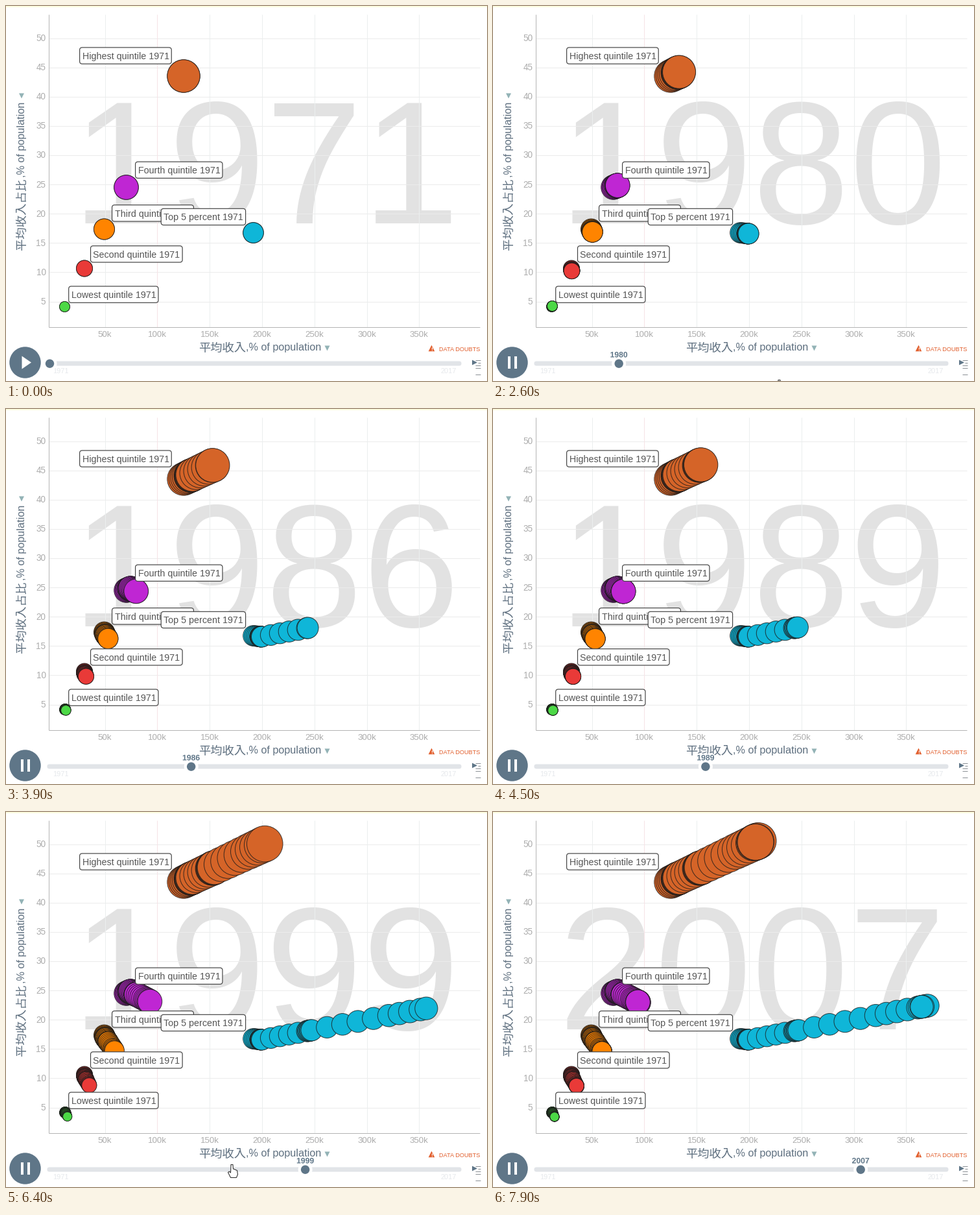
Write a matplotlib script that moves like this. It is 742 by 578 pixels and loops after 8000 ms.

```python
import numpy as np
import matplotlib.pyplot as plt
from matplotlib import patheffects
from matplotlib.animation import FuncAnimation
from matplotlib.patches import Circle, FancyBboxPatch, Polygon, Rectangle

W, H, DPI = 742, 578, 100
FRAMES, STEP = 80, 100
PT = 72 / DPI                      # points per pixel
SANS, CJK = "Liberation Sans", "Noto Sans CJK JP"
SLATE, INK, TICK, ARROW, ALERT = "#5f7688", "#5f7080", "#adadad", "#93b3b6", "#e2602f"

fig = plt.figure(figsize=(W / DPI, H / DPI), dpi=DPI, facecolor="white")
ax = fig.add_axes([0, 0, 1, 1])
ax.set(xlim=(-0.5, W - 0.5), ylim=(H - 0.5, -0.5))   # whole numbers are pixel centres
ax.axis("off")


# ---- drawing helpers (pixel coordinates, y down) ----
def text(x, y, s, size, color, font=SANS, z=3, **kw):
    return ax.text(x, y, s, fontsize=size * PT, color=color, family=font,
                   va="baseline", zorder=z, **kw)


def line(x, y, color, width=1, z=2):
    ax.plot(x, y, color=color, lw=width * PT, zorder=z, solid_capstyle="butt")


def shape(points, color, z=3, lw=0, **kw):
    return ax.add_patch(Polygon(points, fc=color, zorder=z, lw=lw, **kw))


def triangle(x, y, dx, dy, color, z=3):
    """Tip at (x + dx, y + dy), base centred on (x - dx, y - dy)."""
    base = np.array([x - dx, y - dy])
    side = np.array([dy, dx])
    return shape([base - side, base + side, (x + dx, y + dy)], color, z)


def box(x, y, w, h, color, z=3):
    return ax.add_patch(Rectangle((x, y), w, h, fc=color, lw=0, zorder=z))


def round_box(x, y, w, h, radius, z, **kw):
    ax.add_patch(FancyBboxPatch((x, y), w, h, zorder=z,
                                boxstyle=f"round,pad=0,rounding_size={radius}", **kw))


def disc(x, y, r, color, z):
    return ax.add_patch(Circle((x, y), r, fc=color, lw=0, zorder=z))


# ---- chart frame ----
box(-1, -1, W + 1, 2, "#fdfde0")
big_year = text(100.5, 335, "1971", 269, "#e2e2e2", z=1)

for i in range(10):
    y = 455 - 45.1 * i
    line([66, 730], [y, y], "#ebebeb")
    text(61, y + 4.5, str(5 * (i + 1)), 13.5, TICK, ha="right")
for i in range(7):
    x = 152 + 80.8 * i
    line([x, x], [12, 494], "#f6e3e6" if i == 1 else "#ebeeee")
    text(x, 509.5, f"{50 * (i + 1)}k", 13.2, TICK, ha="center")
line([65, 65], [12, 494], "#b4b4b4")
line([65, 730], [494, 494], "#b4b4b4")

UNIT = ",% of population"
text(297, 532, "平均收入", 18.3, INK, CJK)
text(370, 531, UNIT, 16.2, INK)
triangle(495, 527, 0, 4, ARROW)
turn = dict(rotation=90, rotation_mode="anchor", ha="left")
text(29, 375, "平均收入占比", 18.4, INK, CJK, **turn)
text(28, 264, UNIT, 16.2, INK, **turn)
triangle(23.5, 138, 0, 4, ARROW)

triangle(656, 527, 0, -4.8, ALERT)
line([656, 656], [525, 528.5], "white", 1.2, 4)
line([656, 656], [529.3, 530.5], "white", 1.2, 4)
text(667, 531, "DATA DOUBTS", 9.1, ALERT)

# ---- bubbles ----
# The pace drives every group: years since 1971, place of the top group.
PACE = np.array([(0, 381), (4, 391), (10, 394), (15, 464), (20, 471),
                 (25, 590), (29, 655), (35, 670), (37, 655)])
SLUMP, PEAK = 394, 670

# name, colour, then (x, y, radius) at the start, after the slump, at the peak
GROUPS = [
    ("Highest quintile", "#d56428", (273.5, 107.5, 25.7), (287, 101, 26), (408.5, 44, 28.5)),
    ("Fourth quintile", "#bf26d3", (185, 279, 19.3), (192, 276, 19.3), (224, 293, 19.3)),
    ("Third quintile", "#ff8400", (151, 343.5, 16.5), (153, 348, 16.3), (168, 369, 15.5)),
    ("Second quintile", "#e93a38", (120.5, 404, 13), (121, 408, 12.8), (128.5, 422, 12)),
    ("Lowest quintile", "#4cd846", (90, 463, 8.5), (91, 462, 8.4), (94.5, 469.5, 7.5)),
    ("Top 5 percent", "#0fb6d8", (381, 349, 16.3), (394, 350.5, 16.5), (670, 298, 18.2)),
]
bubbles = [ax.scatter([], [], c=color, edgecolors=(0.1, 0.1, 0.1, 0.8), linewidths=PT, zorder=5)
           for _, color, *_ in GROUPS]


def place_bubbles(age):
    """One bubble for each year passed, the current one last."""
    ages = np.append(np.arange(int(age) + 1), age)
    pace = np.interp(ages, *PACE.T)
    for dots, (_, _, *stages) in zip(bubbles, GROUPS):
        x, y, r = (np.interp(pace, [PACE[0, 1], SLUMP, PEAK], v) for v in zip(*stages))
        dots.set_offsets(np.column_stack([x, y]))
        dots.set_sizes(((2 * r - 1) * PT) ** 2)


# Each tag touches the upper left or right of its first bubble with one corner.
for i, (name, _, (x, y, r), *_) in enumerate(GROUPS):
    z = 6 + 0.1 * i
    on_left = name.startswith(("Highest", "Top"))
    bottom = y - 0.73 * r
    label = text(0, bottom - 7.3, f"{name} 1971", 14.3, "#555555", z=z + 0.05)
    width = label.get_window_extent().width + 7.5
    left = x - 0.73 * r - width if on_left else x + 0.73 * r
    label.set_x(left + 4)
    round_box(left, bottom - 25.3, width, 25.3, 4, z, fc="white", ec="#444444", lw=1.2 * PT)

# ---- player ----
disc(29, 549, 24.2, SLATE, 3)
play = shape([(24, 539), (38.5, 549), (24, 559)], "white", 4)
pause = [box(x, 539.5, 4.8, 19, "white", 4) for x in (22, 32)]
for x, s in [(84, "1971"), (682, "2017")]:
    text(x, 566, s, 11, "#e6e9ec", ha="center")
round_box(63, 547, 639, 7, 3.4, 3, fc="#e1e4e8", lw=0)
halo = disc(67, 550.7, 11, "white", 4)
knob = disc(67, 550.7, 6.7, SLATE, 5)
knob_year = text(67, 541, "", 12.2, SLATE, z=8, ha="center", weight="bold")
knob_year.set_path_effects([patheffects.withStroke(linewidth=2.5, foreground="white")])

shape([(718.5, 545), (726.5, 549), (718.5, 553)], SLATE, 4)
for y in (545, 549, 553, 557, 567):
    line([727 if y == 549 else 723, 731], [y, y], "#8a8f94")

# ---- pointer: outline around the fingertip, and (time, x, y) of its path ----
HAND = np.array([(-1.5, 0), (1.5, 0), (2, 6.5), (8, 9), (9, 15), (7, 20),
                 (-2, 20), (-6, 12), (-4, 10.5), (-2, 12.5)])
hand = shape(HAND, "white", 9, ec="#333333", lw=1.1 * PT, joinstyle="round")
TOUR = np.array([(0, 60, 600), (0.6, 32, 550), (0.9, 32, 550), (1.6, 448, 551), (2.6, 441, 576),
                 (2.8, 440, 600), (4.7, 330, 600), (5.2, 334, 554), (6.4, 348, 543),
                 (7.2, 360, 600)])

START, RATE = 0.8, 5.1             # seconds, years per second


def update(frame):
    t = frame * STEP / 1000
    age = max(0.0, RATE * (t - START))
    year = str(1971 + int(age))
    running = t >= START
    big_year.set_text(year)
    place_bubbles(age)
    x = 67 + 13.8 * age
    halo.center = knob.center = (x, 550.7)
    knob_year.set_x(x)
    knob_year.set_text(year if running else "")
    play.set_visible(not running)
    for bar in pause:
        bar.set_visible(running)
    times, xs, ys = TOUR.T
    hand.set_xy(HAND + [np.interp(t, times, xs), np.interp(t, times, ys)])
    return []


anim = FuncAnimation(fig, update, frames=FRAMES, interval=STEP, repeat=True, repeat_delay=0)
plt.show()
```
